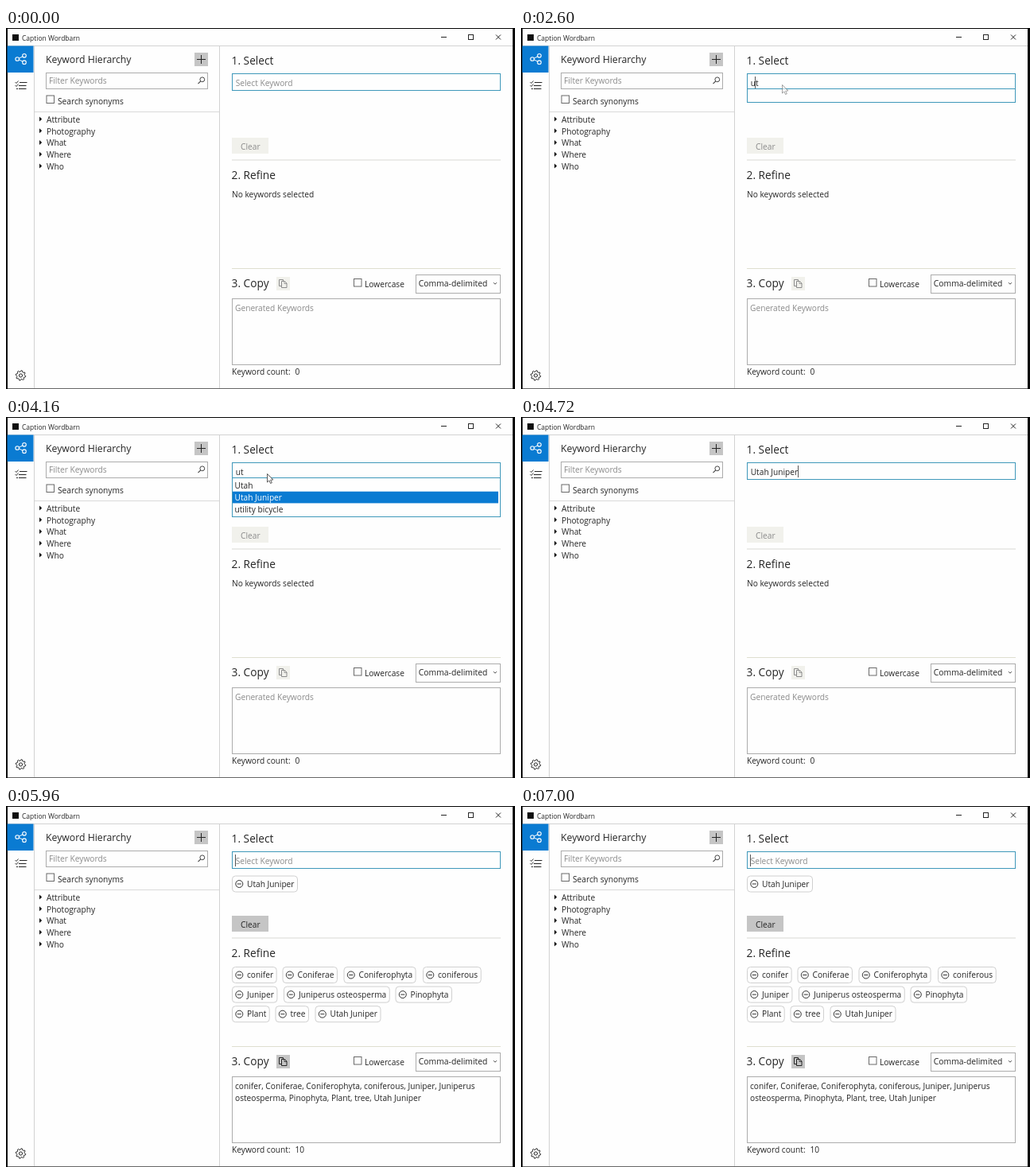
These frames come from a looping animation (640 px wide and 454 px high, 7.44 s). An HTML page with a canvas:

```html
<!DOCTYPE html>
<html lang="en">
<head>
<meta charset="utf-8">
<title>Caption Wordbarn</title>
<style>
  html, body { margin: 0; width: 100%; height: 100%; overflow: hidden; background: #000; }
  canvas { display: block; width: 640px; height: 454px; }
</style>
</head>
<body>
<canvas id="stage"></canvas>
<script>
const W = 640, H = 454, LOOP = 7440;
const INK = '#252525', HINT = '#8b8b8b', BLUE = '#0a7bd2', EDGE = '#3f98ba';
const BOX = '#acacac', BUTTON = '#c5c5c5', DISABLED = '#f1f1ec';
const BODY = 10.2, HEAD = 13.7;

// Moments of the interaction, in ms
const TYPE_U = 2080, TYPE_T = 2600, RESULTS = 2640, ARROW_DOWN = 3600, ACCEPT = 4320, COMMIT = 4800;
const CARET_ON = [[280, 840], [1360, 1880], [2080, 3120], [3640, 4160], [4320, 5360], [5960, 6400], [7000, LOOP]];

const canvas = document.getElementById('stage');
const ctx = canvas.getContext('2d');
const dpr = window.devicePixelRatio || 1;
canvas.width = W * dpr;
canvas.height = H * dpr;

const family = '"Open Sans", "Noto Sans", sans-serif';

function text(str, x, y, size = BODY, color = INK) {
  ctx.font = `${size}px ${family}`;
  ctx.fillStyle = color;
  ctx.fillText(str, x, y);
}

function widthOf(str, size = BODY) {
  ctx.font = `${size}px ${family}`;
  return ctx.measureText(str).width;
}

function fill(x, y, w, h, color) {
  ctx.fillStyle = color;
  ctx.fillRect(x, y, w, h);
}

function frame(x, y, w, h, color, line = 1) {
  ctx.strokeStyle = color;
  ctx.lineWidth = line;
  ctx.strokeRect(x + 0.5, y + 0.5, w - 1, h - 1);
}

function stroke(points, color = INK, line = 1, close = false) {
  ctx.beginPath();
  points.forEach(([x, y]) => ctx.lineTo(x, y));
  if (close) ctx.closePath();
  ctx.strokeStyle = color;
  ctx.lineWidth = line;
  ctx.stroke();
}

function ring(x, y, r, color = INK, line = 1) {
  ctx.beginPath();
  ctx.arc(x, y, r, 0, Math.PI * 2);
  ctx.strokeStyle = color;
  ctx.lineWidth = line;
  ctx.stroke();
}

function checkbox(x, y) {
  frame(x, y, 10.5, 10.5, '#6a6a6a');
}

function titleBar() {
  fill(0, 0, W, H, '#050505');
  fill(2, 1, 635, 452, '#fefefe');
  fill(2, 453, 635, 1, '#666');
  fill(8, 8, 8, 8, '#111');
  text('Caption Wordbarn', 20, 15.5, 8.5);
  fill(547, 11, 7, 1, INK);
  frame(581, 8, 7, 7, INK);
  stroke([[616, 8.5], [622, 14.5]]);
  stroke([[622, 8.5], [616, 14.5]]);
  fill(2, 22, 635, 1, '#d2d2d2');
}

function shareIcon() {
  const white = '#fff';
  stroke([[22, 35.2], [15, 39], [22, 42.8]], white);
  for (const [x, y] of [[14.2, 39], [23, 34.8], [23, 43.2]]) {
    ctx.beginPath();
    ctx.arc(x, y, 2.3, 0, Math.PI * 2);
    ctx.fillStyle = BLUE;
    ctx.fill();
    ring(x, y, 2.3, white, 1.1);
  }
}

function checklistIcon() {
  [68, 72, 76].forEach((y, i) => {
    fill(16 + (i === 0 ? 1 : 0), y, 9.5, 1, INK);
    if (i < 2) stroke([[11.5, y], [13, y + 1.5], [15.5, y - 1.5]], INK, 0.9);
  });
  fill(13, 76, 2, 1, INK);
}

function gearIcon(cx, cy) {
  const rim = [];
  for (let i = 0; i < 32; i++) {
    const a = (i + 0.5) / 32 * Math.PI * 2;
    const r = i % 4 < 2 ? 6.3 : 4.8;
    rim.push([cx + r * Math.cos(a), cy + r * Math.sin(a)]);
  }
  stroke(rim, INK, 1, true);
  ring(cx, cy, 2.1);
}

function sidebar() {
  fill(1.5, 22.5, 33, 33.5, BLUE);
  fill(35, 23, 1, 430, '#d2d2d2');
  shareIcon();
  checklistIcon();
  gearIcon(18.5, 437);
}

function hierarchy() {
  text('Keyword Hierarchy', 50, 44.2, 12.25);
  fill(237, 31, 17, 17, BUTTON);
  fill(240, 39, 11, 1, INK);
  fill(245, 34, 1, 11, INK);

  frame(50, 56, 204, 21, BOX);
  text('Filter Keywords', 54, 70.3, BODY, HINT);
  ring(246.8, 64.8, 2.9, '#444');
  stroke([[244.7, 66.9], [241.5, 70.2]], '#444', 1.1);

  checkbox(50.5, 84.5);
  text('Search synonyms', 65, 95.6);
  fill(36, 105, 232, 1, '#dadada');
  fill(268, 23, 1, 430, '#d2d2d2');

  ['Attribute', 'Photography', 'What', 'Where', 'Who'].forEach((name, i) => {
    const y = 118.8 + i * 14.7;
    ctx.beginPath();
    ctx.moveTo(42, y - 7.2);
    ctx.lineTo(45.2, y - 4.2);
    ctx.lineTo(42, y - 1.2);
    ctx.fillStyle = '#111';
    ctx.fill();
    text(name, 51, y);
  });
}

function copyIcon(color) {
  stroke([[346, 324.5], [343.5, 324.5], [343.5, 316.5], [348.5, 316.5], [348.5, 318]], color);
  stroke([[346.5, 318.5], [350.5, 318.5], [353, 321], [353, 326.5], [346.5, 326.5]], color, 1, true);
  stroke([[350, 318.5], [350, 321.5], [353, 321.5]], color, 0.8);
}

function panels(done) {
  text('1. Select', 283.6, 45.5, HEAD);
  fill(284, 138, 46, 20, done ? BUTTON : DISABLED);
  text('Clear', 295, 152.8, BODY, done ? INK : HINT);
  fill(284, 165.5, 338, 1, '#d9d9d6');

  text('2. Refine', 283.6, 189.6, HEAD);
  fill(284, 302, 338, 1, '#dfdfd0');

  text('3. Copy', 283.6, 326, HEAD);
  fill(340, 313, 17, 17, done ? BUTTON : DISABLED);
  copyIcon(done ? INK : '#8c8c8c');
  checkbox(437, 315);
  text('Lowercase', 451, 325.7);
  frame(515, 310, 107, 24, BOX);
  text('Comma-delimited', 518.8, 324.7, 10.35);
  stroke([[613, 320.2], [615, 322.2], [617, 320.2]], '#444');
  frame(284, 340, 338, 84, BOX);
  text('Keyword count:', 284, 436.3);
  text(done ? '10' : '0', 363.5, 436.3);
}

function chip(label, x, y) {
  ctx.beginPath();
  ctx.roundRect(x + 0.5, y + 0.5, widthOf(label) + 22.5, 20, 4);
  ctx.strokeStyle = '#d0d0d0';
  ctx.lineWidth = 1;
  ctx.stroke();
  ring(x + 9.3, y + 10.5, 4.5, '#333');
  fill(x + 6.8, y + 10, 5, 1, '#333');
  text(label, x + 19, y + 14.2);
}

const refined = [
  [202, ['conifer', 284], ['Coniferae', 347.5], ['Coniferophyta', 424.5], ['coniferous', 524]],
  [226.6, ['Juniper', 284], ['Juniperus osteosperma', 349], ['Pinophyta', 489.5]],
  [251.2, ['Plant', 284], ['tree', 338.5], ['Utah Juniper', 388.5]]
];

function results(done) {
  if (!done) {
    text('No keywords selected', 284, 213);
    text('Generated Keywords', 288, 356, BODY, HINT);
    return;
  }
  chip('Utah Juniper', 284, 87.5);
  for (const [y, ...chips] of refined) {
    chips.forEach(([label, x]) => chip(label, x, y));
  }
  text('conifer, Coniferae, Coniferophyta, coniferous, Juniper, Juniperus', 288, 356);
  text('osteosperma, Pinophyta, Plant, tree, Utah Juniper', 288, 370.6);
}

function entryAt(t) {
  if (t < TYPE_U || t >= COMMIT) return '';
  if (t < TYPE_T) return 'u';
  return t < ACCEPT ? 'ut' : 'Utah Juniper';
}

function dropdown(t) {
  if (t < TYPE_T || t >= ACCEPT) return;
  const filled = t >= RESULTS;
  const h = filled ? 50 : 18;
  fill(284, 76, 338, h, '#fefefe');
  frame(284, 76, 338, h, EDGE);
  if (!filled) return;
  const active = t < ARROW_DOWN ? 0 : 1;
  ['Utah', 'Utah Juniper', 'utility bicycle'].forEach((item, i) => {
    const y = 79 + i * 14.7;
    if (i === active) fill(285, y, 334, 14.7, BLUE);
    text(item, 287.5, y + 11.4, BODY, i === active ? '#fff' : INK);
  });
}

function selectBox(t) {
  const entry = entryAt(t);
  const left = 288.7;
  frame(284, 57, 338, 22, EDGE);
  dropdown(t);
  text(entry || 'Select Keyword', left, 73, BODY, entry ? INK : HINT);
  if (CARET_ON.some(([from, to]) => t >= from && t < to)) {
    // the caret trails the second letter by one step
    const before = t >= TYPE_T && t < RESULTS ? 'u' : entry;
    fill(Math.floor(left + (before ? widthOf(before) : 0)), 61, 1, 15, '#555');
  }
}

function pointer(t) {
  const alpha = Math.min(1, Math.max(0, (t - 2500) / 180));
  if (!alpha || t >= ACCEPT) return;
  ctx.save();
  ctx.globalAlpha = alpha;
  ctx.translate(328.5, 71.5);
  ctx.beginPath();
  const shape = [[0, 0], [0, 10.5], [2.4, 8.4], [4.1, 12], [5.8, 11.2], [4.2, 7.7], [7.4, 7.4]];
  shape.forEach(([x, y]) => ctx.lineTo(x, y));
  ctx.closePath();
  ctx.fillStyle = '#fff';
  ctx.fill();
  ctx.strokeStyle = '#333';
  ctx.lineWidth = 0.8;
  ctx.stroke();
  ctx.restore();
}

function draw(t) {
  const done = t >= COMMIT;
  ctx.setTransform(dpr, 0, 0, dpr, 0, 0);
  titleBar();
  sidebar();
  hierarchy();
  panels(done);
  results(done);
  selectBox(t);
  pointer(t);
}

const start = performance.now();
function tick() {
  draw((performance.now() - start) % LOOP);
  requestAnimationFrame(tick);
}
tick();
</script>
</body>
</html>
```
